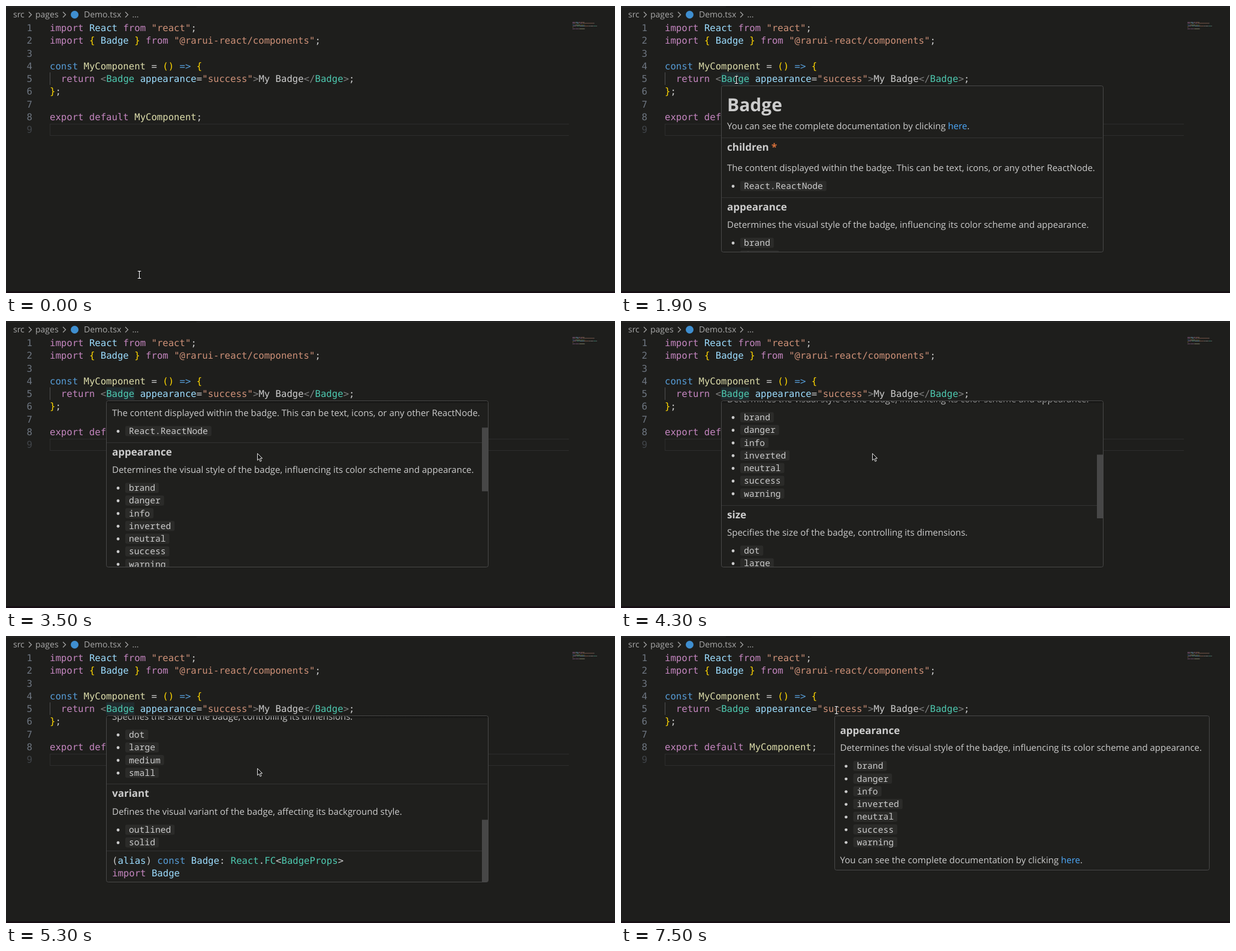
Write an HTML page with a canvas that moves like this. It is 1016 by 480 pixels and loops after 8 s.

```html
<!DOCTYPE html>
<html lang="en">
<head>
<meta charset="utf-8">
<title>Editor hover docs</title>
<style>
  html, body { margin: 0; width: 100%; height: 100%; overflow: hidden; background: #1e1e1c; }
  canvas { display: block; width: 1016px; height: 480px; }
</style>
</head>
<body>
<canvas id="stage"></canvas>
<script>
const W = 1016, H = 480, LOOP = 8000, STEP = 100;
const canvas = document.getElementById('stage');
const ctx = canvas.getContext('2d');
const dpr = window.devicePixelRatio || 1;
canvas.width = W * dpr;
canvas.height = H * dpr;

const SANS = '"Open Sans", "Noto Sans", sans-serif';
const CODE = '15.64px "DejaVu Sans Mono", monospace';
const CHIP = '14.65px "Noto Sans Mono", monospace';
const BODY = `15px ${SANS}`;
const HEAD = `bold 17px ${SANS}`;
const ADV = 9.416, ROW = 21.25, LEFT = 73;

const C = {
  bg: '#1e1e1c', panel: '#1f1f1d', text: '#cccccc', key: '#c586c0', name: '#9cdcfe',
  str: '#ce9178', gold: '#ffd700', blue: '#569cd6', fn: '#dcdcaa', type: '#4ec9b0',
  tag: '#808080', num: '#6e7681', crumb: '#a9a9a9', link: '#4daafc', border: '#484848',
  rule: '#333333'
};

// Alternating colour name and text.
const SOURCE = [
  ['key', 'import ', 'name', 'React ', 'key', 'from ', 'str', '"react"', 'text', ';'],
  ['key', 'import ', 'gold', '{ ', 'name', 'Badge ', 'gold', '} ', 'key', 'from ',
    'str', '"@rarui-react/components"', 'text', ';'],
  [],
  ['blue', 'const ', 'fn', 'MyComponent ', 'text', '= ', 'gold', '() ', 'blue', '=> ', 'gold', '{'],
  ['key', '  return ', 'tag', '<', 'type', 'Badge ', 'name', 'appearance', 'text', '=',
    'str', '"success"', 'tag', '>', 'text', 'My Badge', 'tag', '</', 'type', 'Badge',
    'tag', '>', 'text', ';'],
  ['gold', '}', 'text', ';'],
  [],
  ['key', 'export default ', 'fn', 'MyComponent', 'text', ';'],
  []
];
const ALIAS = [
  ['text', '(', 'name', 'alias', 'text', ') ', 'blue', 'const ', 'name', 'Badge', 'text', ': ',
    'type', 'React', 'text', '.', 'type', 'FC', 'text', '<', 'type', 'BadgeProps', 'text', '>'],
  ['key', 'import ', 'name', 'Badge']
];
const LOOKS = ['brand', 'danger', 'info', 'inverted', 'neutral', 'success', 'warning'];
const LOOKS_DOC = 'Determines the visual style of the badge, influencing its color scheme and appearance.';

// Pointer keys: time, x, y.
const PATH = [
  [0, 222.5, 449.5], [900, 199, 123], [1000, 199, 123], [1100, 184.5, 120], [1800, 184.5, 120],
  [2700, 419.5, 221.5], [6200, 419.5, 221.5], [6700, 402, 86], [7100, 363, 121], [7200, 359.5, 124]
];
const CLOSE = 6700;
const NOTCH = 39.1, MAX_SCROLL = 454;

const clamp = (v, a, b) => Math.min(b, Math.max(a, v));

function rect(x, y, w, h, color) {
  ctx.fillStyle = color;
  ctx.fillRect(x, y, w, h);
}

function text(s, x, y, font, color = C.text, align = 'left') {
  ctx.font = font;
  ctx.fillStyle = color;
  ctx.textAlign = align;
  ctx.fillText(s, x, y);
  return x + ctx.measureText(s).width;
}

function dot(x, y, r, color) {
  ctx.fillStyle = color;
  ctx.beginPath();
  ctx.arc(x, y, r, 0, 7);
  ctx.fill();
}

function line(points, color, width) {
  ctx.strokeStyle = color;
  ctx.lineWidth = width;
  ctx.beginPath();
  points.forEach(([x, y]) => ctx.lineTo(x, y));
  ctx.stroke();
}

function rounded(x, y, w, h) {
  const path = new Path2D();
  path.roundRect(x, y, w, h, 3);
  return path;
}

function codeLine(tokens, x, y) {
  for (let i = 0; i < tokens.length; i += 2) {
    text(tokens[i + 1], x, y, CODE, C[tokens[i]]);
    x += tokens[i + 1].length * ADV;
  }
}

function breadcrumb() {
  const font = `14px ${SANS}`;
  text('src', 12, 19, font, C.crumb);
  text('pages', 49, 19, font, C.crumb);
  text('Demo.tsx', 130, 19, font, C.crumb);
  text('…', 210.5, 19, font, C.crumb);
  for (const x of [38, 95, 199]) line([[x, 10], [x + 4.5, 14.5], [x, 19]], C.crumb, 1.2);
  dot(114.5, 14.5, 6.5, '#3f8fd0');
}

function minimap() {
  ctx.globalAlpha = 0.55;
  SOURCE.forEach((tokens, row) => {
    let col = 0;
    for (let i = 0; i < tokens.length; i += 2) {
      for (const ch of tokens[i + 1]) {
        if (ch !== ' ') rect(945 + col * 0.76, 26.8 + row * 1.55, 0.76, 1, C[tokens[i]]);
        col++;
      }
    }
  });
  ctx.globalAlpha = 1;
}

function editor(highlight) {
  rect(0, 0, W, H, C.bg);
  rect(318, 0, W - 318, 1, '#181818');
  rect(0, 1, 175, 1, '#2b2b2b');
  rect(318, 1, W - 318, 1, '#2b2b2b');
  rect(0, 477, W, 3, '#170f14');
  breadcrumb();
  rect(LEFT, 197, 866, 1, '#2d2d2d');
  rect(LEFT, 216, 866, 1, '#2d2d2d');
  rect(LEFT, 197, 1, 20, '#2d2d2d');
  rect(LEFT, 111, 1, 21, '#505050');
  if (highlight) rect(LEFT + 10 * ADV, 111, 5 * ADV, 21, 'rgba(38,79,100,.25)');
  SOURCE.forEach((tokens, i) => {
    const y = Math.round(42 + i * ROW);
    text(i + 1, 43.8, y, CODE, i === 8 ? '#41454a' : C.num, 'right');
    codeLine(tokens, LEFT, y);
  });
  minimap();
}

function panel(x, y, w, h, body) {
  const frame = rounded(x + 0.5, y + 0.5, w - 1, h - 1);
  ctx.fillStyle = C.panel;
  ctx.fill(frame);
  ctx.save();
  ctx.clip(frame);
  body();
  ctx.restore();
  ctx.strokeStyle = C.border;
  ctx.lineWidth = 1;
  ctx.stroke(frame);
}

// Documentation blocks, placed by the middle of their first row.
const para = (s, x, y) => text(s, x, y + 5, BODY);
const title = (s, x, y) => text(s, x, y + 6, HEAD);
const rule = y => rect(168, y, 635, 1, C.rule);

function clickHere(x, y) {
  const linkX = para('You can see the complete documentation by clicking ', x, y);
  const end = text('here', linkX, y + 5, BODY, C.link);
  para('.', end, y);
}

function list(items, x, y) {
  items.forEach((s, i) => {
    const mid = y + i * ROW;
    ctx.font = CHIP;
    ctx.fillStyle = '#2b2b29';
    ctx.fill(rounded(x + 22, mid - 8.5, ctx.measureText(s).width + 12, 17));
    dot(x + 10, mid + 0.5, 2.4, C.text);
    text(s, x + 28, mid + 5, CHIP);
  });
}

function badgeDocs(scroll, bar) {
  const x = 177;
  panel(167, 133, 638, 279, () => {
    ctx.save();
    ctx.translate(0, -scroll);
    text('Badge', x, 176, `bold 30px ${SANS}`);
    clickHere(x, 201);
    rule(220);
    const star = title('children ', x, 236);
    text('*', star, 242, HEAD, '#d7703a');
    para('The content displayed within the badge. This can be text, icons, or any other ReactNode.', x, 271);
    list(['React.ReactNode'], x, 301);
    rule(320);
    title('appearance', x, 336);
    para(LOOKS_DOC, x, 366);
    list(LOOKS, x, 396);
    rule(543);
    title('size', x, 559);
    para('Specifies the size of the badge, controlling its dimensions.', x, 589);
    list(['dot', 'large', 'medium', 'small'], x, 619);
    rule(701);
    title('variant', x, 717);
    para('Defines the visual variant of the badge, affecting its background style.', x, 748);
    list(['outlined', 'solid'], x, 778);
    rule(813);
    codeLine(ALIAS[0], x, 835);
    codeLine(ALIAS[1], x, 856);
    ctx.restore();
    if (scroll > 0) {
      const shade = ctx.createLinearGradient(0, 134, 0, 138);
      shade.addColorStop(0, 'rgba(0,0,0,.4)');
      shade.addColorStop(1, 'rgba(0,0,0,0)');
      rect(168, 134, 636, 4, shade);
    }
    if (bar) rect(794, 133.5 + scroll * 0.383, 11, 106.5, '#474747');
  });
}

function appearanceDocs() {
  const x = 365.5;
  panel(356, 133, 626, 259, () => {
    title('appearance', x, 157.5);
    para(LOOKS_DOC, x, 187);
    list(LOOKS, x, 217.3);
    clickHere(x, 375);
  });
}

function pointerAt(t) {
  let i = 0;
  while (i < PATH.length - 2 && t > PATH[i + 1][0]) i++;
  const [t0, x0, y0] = PATH[i], [t1, x1, y1] = PATH[i + 1];
  const p = clamp((t - t0) / (t1 - t0), 0, 1);
  const e = p * p * (3 - 2 * p);
  return [x0 + (x1 - x0) * e, y0 + (y1 - y0) * e];
}

function beam(x, y) {
  for (const [color, width] of [['#000', 3], ['#fff', 1.2]]) {
    line([[x, y - 6], [x, y + 6]], color, width);
    for (const s of [-6, 6]) line([[x - 2.8, y + s], [x + 2.8, y + s]], color, width);
  }
}

function arrow(x, y) {
  ctx.beginPath();
  [[0, 0], [0, 11.5], [2.7, 9], [4.6, 13.4], [6.6, 12.5], [4.7, 8.2], [8.2, 8.2]]
    .forEach(([dx, dy]) => ctx.lineTo(x + dx, y + dy));
  ctx.closePath();
  ctx.fillStyle = '#111';
  ctx.fill();
  ctx.strokeStyle = '#e0e0e0';
  ctx.lineWidth = 1;
  ctx.stroke();
}

// Wheel travel so far: three bursts, one notch per step.
function scrollAt(t) {
  const burst = (start, n) => clamp((t - start) / STEP + 1, 0, n);
  return Math.min(MAX_SCROLL, NOTCH * (burst(3300, 5) + burst(4300, 5) + burst(5100, 3)));
}

function draw(time) {
  const t = Math.floor((time % LOOP) / STEP + 0.001) * STEP;
  const open = t >= 1300 && t < CLOSE;
  const [x, y] = pointerAt(t);
  const inside = open && y > 133;

  ctx.setTransform(dpr, 0, 0, dpr, 0, 0);
  ctx.textBaseline = 'alphabetic';
  ctx.textRendering = 'geometricPrecision';
  editor(open);
  if (open) {
    ctx.globalAlpha = clamp((t - 1200) / 300, 0, 1);
    badgeDocs(Math.round(scrollAt(t)), inside);
  } else if (t >= 7300) {
    ctx.globalAlpha = clamp((t - 7200) / 300, 0, 1);
    appearanceDocs();
  }
  ctx.globalAlpha = 1;
  (inside ? arrow : beam)(x, y);
}

const start = performance.now();
function tick() {
  draw(performance.now() - start);
  requestAnimationFrame(tick);
}
tick();
</script>
</body>
</html>
```
